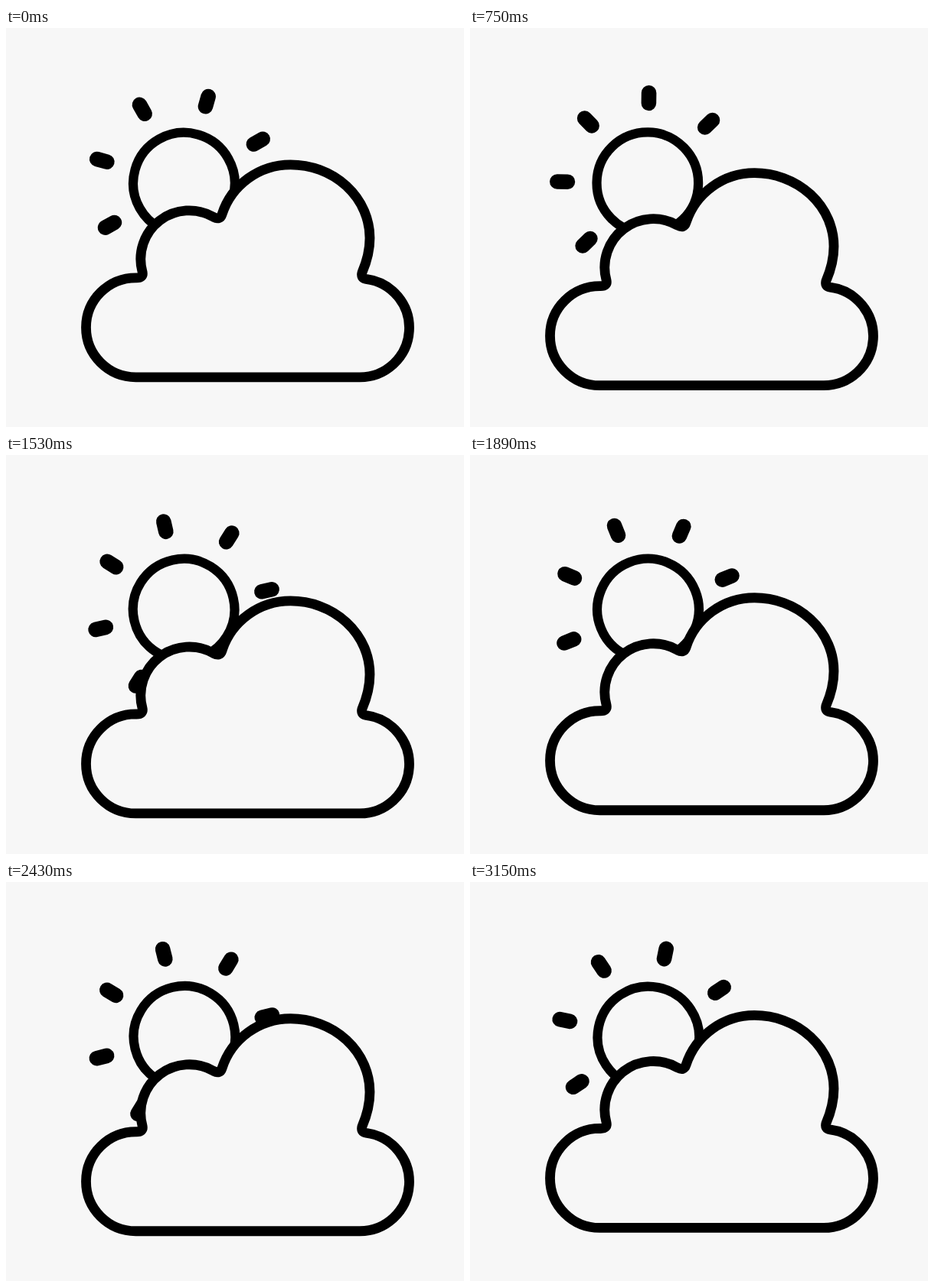
Write an HTML page that moves like this. It is 598 px wide and 522 px high and loops after 3210 ms.

```html
<!DOCTYPE html>
<html lang="en">
<head>
<meta charset="utf-8">
<title>Sun and cloud</title>
<style>
  html, body { margin: 0; width: 100%; height: 100%; overflow: hidden; background: #f7f7f7; }
  svg { display: block; width: 598px; height: 522px; fill: none; stroke: #000; stroke-linecap: round; stroke-linejoin: round; }
</style>
</head>
<body>
<svg viewBox="0 0 598 522">
  <g id="sun"><circle r="66.3" stroke-width="12.2"/></g>
  <path id="cloud" fill="#f7f7f7" stroke-width="12.8" d="M169.5 457
    A65 65 0 0 1 169.5 327 Q180 327.5 178 319
    A63.5 63.5 0 0 1 271 247.5 Q279.5 252 282 244
    A94 94 0 0 1 371.5 179 A103.5 96 0 0 1 475 275
    C475 293 471 306 465 320 Q463 327.5 470 328.5
    A64.5 64.5 0 0 1 462 457 Z"/>
</svg>
<script>
const LOOP = 3210, STEP = 30;
const sun = document.getElementById('sun');
const cloud = document.getElementById('cloud');

for (let i = 0; i < 8; i++) {
  const ray = document.createElementNS('http://www.w3.org/2000/svg', 'line');
  ray.setAttribute('y1', -118);
  ray.setAttribute('y2', -104.4);
  ray.setAttribute('stroke-width', 19.6);
  ray.setAttribute('transform', `rotate(${i * 45})`);
  sun.append(ray);
}

// Nearly steady turn: [time in ms, degrees]
const turnKeys = [[0, 0], [450, 45.5], [1080, 108], [1530, 151.5], [1890, 187.5], [2430, 240.5], [3150, 310.8]];

function turnAt(t) {
  const last = turnKeys.length - 1;
  if (t >= turnKeys[last][0]) return turnKeys[last][1];
  const i = turnKeys.findIndex(key => key[0] > t);
  const [t0, a0] = turnKeys[i - 1], [t1, a1] = turnKeys[i];
  return a0 + (a1 - a0) * (t - t0) / (t1 - t0);
}

function draw(time) {
  const t = Math.floor(time % LOOP / STEP) * STEP;
  const turn = turnAt(t), rad = turn * Math.PI / 180;
  // The sun turns about a point slightly above its centre
  const x = 232.4 - 0.6 * Math.sin(rad), y = 202.6 + 0.6 * Math.cos(rad);
  sun.setAttribute('transform', `translate(${x} ${y}) rotate(${turn + 15.6})`);
  // The cloud bobs once per full turn
  const bob = 4.3 + 9 * Math.cos(rad - Math.PI * 2 / 3);
  cloud.setAttribute('transform', `translate(0 ${bob})`);
}

const start = performance.now();
function tick() {
  draw(performance.now() - start);
  requestAnimationFrame(tick);
}
tick();
</script>
</body>
</html>
```
